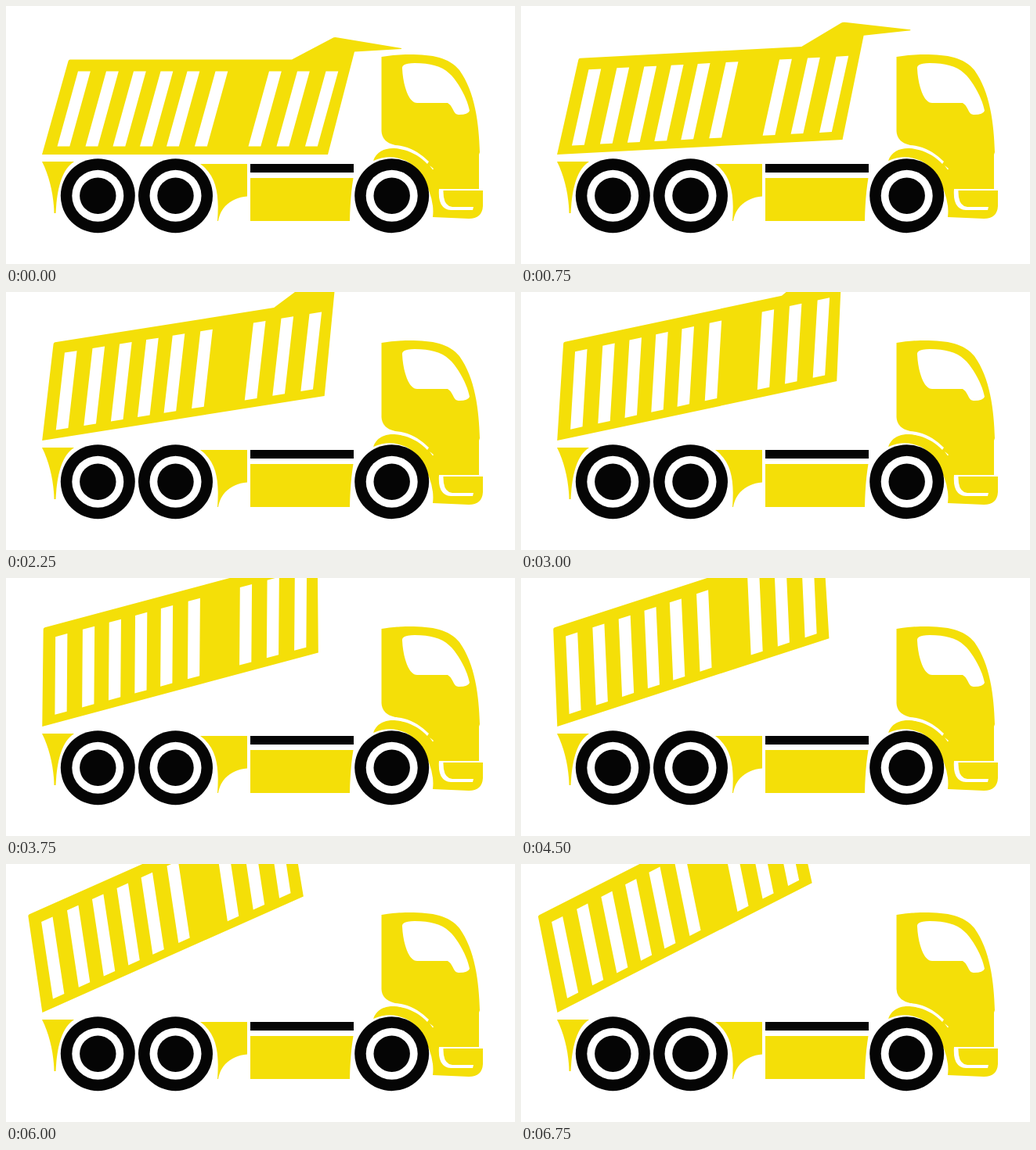
An HTML page for the animation above (8 s loop, 650 by 330 pixels).

```html
<!DOCTYPE html>
<html lang="en">
<head>
<meta charset="utf-8">
<title>Tipper truck</title>
<style>
  html, body { margin: 0; width: 100%; height: 100%; overflow: hidden; background: #fff; }
  svg { display: block; width: 650px; height: 330px; fill: #f4df08; }
  .gap { fill: #fff; }
  .dark { fill: #050505; }
</style>
</head>
<body>
<svg viewBox="0 0 650 330">
  <defs>
    <g id="wheel">
      <circle class="dark" r="47.5"/>
      <circle class="gap" r="33"/>
      <circle class="dark" r="23.2"/>
    </g>
  </defs>

  <!-- chassis -->
  <path d="M46 199H87C70 210 65 237 63.500 265H61.500C61 243 56 219 46 199Z"/>
  <path d="M248 202H308V243.500C288 245 274 257 271 275H270C272 246 271 218 248 202Z"/>
  <path class="dark" d="M312 202H444V213H312Z"/>
  <path d="M312 220H443.500Q439.500 244 439 275H312Z"/>

  <!-- cab and front fender -->
  <path d="M479.500 65Q496 62 515 62C545 62 566 66 579 82C599 110 604 150 605 187L604 190V236H609V256Q608 272 591 272L545 270Q547 254 540 236L522 206C508 193 488 189 469 198C473 186 484 181.500 496 182C512 183 528 191 538 202L540 199C528 187 514 179 497 178Q480 174 479.500 160Z"/>
  <path class="gap" d="M541 204L546 208L545 209.500Z"/>
  <path class="gap" d="M506 80Q505 73 522 73Q537 73 547 76C563 80 571 90 578 101C586 114 590 124 592 134Q590 139 579 139C570 139 573 130 564 124H525C514 124 507 101 506 80Z"/>
  <path class="gap" d="M553 234H609V236H558.500Q558 256 570 257H597L596 261H568Q551 260 553 234Z"/>

  <use href="#wheel" x="117.300" y="242.700"/>
  <use href="#wheel" x="216.500" y="242.700"/>
  <use href="#wheel" x="492.700" y="242.700"/>

  <g id="bed">
    <path d="M82 68.500H365L417 41Q419 39.500 424 40.500L505 54V55L445 58.500L411 190H46L79.500 70.500Q80 68.500 82 68.500Z"/>
    <path id="slots" class="gap"/>
  </g>
</svg>
<script>
  const LOOP = 8000, STEP = 750, DEGREES = 3, MAX_STEP = 9;
  const bed = document.getElementById('bed');
  const slots = [92, 128, 163, 197.5, 231.5, 267.5, 336, 372, 408.5];

  document.getElementById('slots').setAttribute('d',
    slots.map(x => `M${x} 83.500h15.800l-26.500 96h-15.800z`).join(''));

  // The bed tips up around its rear lower corner in fixed steps.
  function draw(now) {
    const step = Math.min(MAX_STEP, Math.floor(now % LOOP / STEP));
    bed.setAttribute('transform', `rotate(${-DEGREES * step} 46 189)`);
    requestAnimationFrame(draw);
  }
  draw(0);
</script>
</body>
</html>
```
